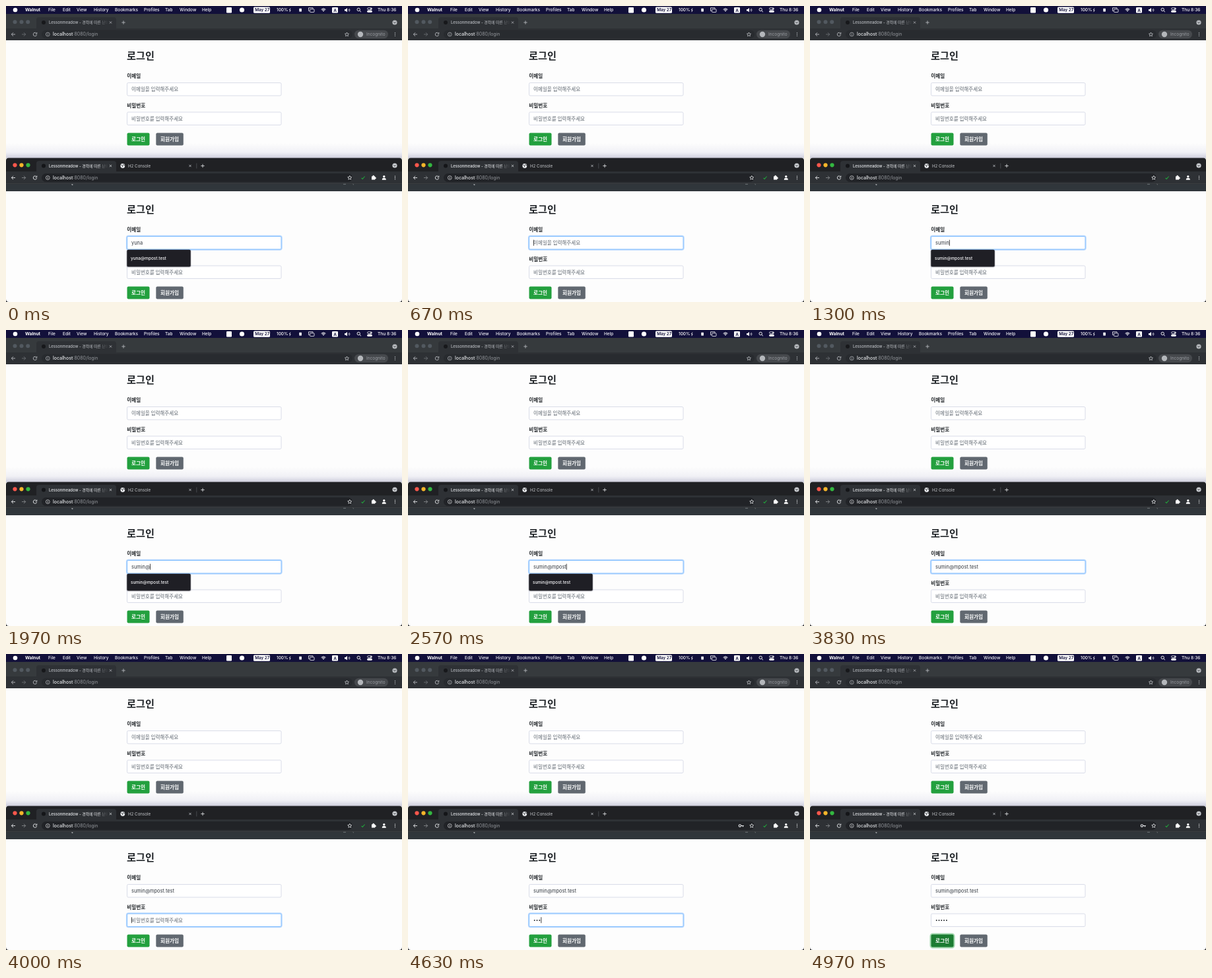
An HTML page with a canvas for the animation above (5.01 s loop, 600 px wide and 449 px high).

```html
<!DOCTYPE html>
<html lang="ko">
<head>
<meta charset="utf-8">
<title>로그인</title>
<style>
html, body { margin: 0; width: 100%; height: 100%; overflow: hidden; background: #000; }
canvas { display: block; width: 600px; height: 449px; }
</style>
</head>
<body>
<canvas id="stage"></canvas>
<script>
const W = 600, H = 449, LOOP = 5010;
const FONT = 'Inter, "Noto Sans CJK KR", "Noto Sans CJK", sans-serif';
const KO = '"Noto Sans CJK KR", "Noto Sans CJK", sans-serif';
const INK = '#212529', PAGE = '#fdfdfd', STRIP = '#202124', BAR = '#2e3135', LIGHT = '#e8eaed';
const OLD_MAIL = 'yuna@mpost.test', NEW_MAIL = 'sumin@mpost.test';

const canvas = document.getElementById('stage');
const ratio = window.devicePixelRatio || 1;
canvas.width = W * ratio;
canvas.height = H * ratio;
const c = canvas.getContext('2d');
c.scale(ratio, ratio);

function text(s, x, y, size, color, weight = 400, family = FONT) {
  c.font = `${weight} ${size}px ${family}`;
  c.fillStyle = color;
  c.textBaseline = 'alphabetic';
  c.fillText(s, x, y);
  return c.measureText(s).width;
}
function box(x, y, w, h, color, r = 0) {
  c.fillStyle = color;
  c.beginPath();
  c.roundRect(x, y, w, h, r);
  c.fill();
}
function frame(x, y, w, h, color, lw, r = 0) {
  c.strokeStyle = color;
  c.lineWidth = lw;
  c.beginPath();
  c.roundRect(x, y, w, h, r);
  c.stroke();
}
function dot(x, y, r, color) {
  c.fillStyle = color;
  c.beginPath();
  c.arc(x, y, r, 0, 7);
  c.fill();
}
function ring(x, y, r, color, lw = 0.8, a = 0, b = Math.PI * 2) {
  c.strokeStyle = color;
  c.lineWidth = lw;
  c.beginPath();
  c.arc(x, y, r, a, b);
  c.stroke();
}
// Each path is a flat list: x0, y0, x1, y1, ...
function line(color, lw, ...paths) {
  c.strokeStyle = color;
  c.lineWidth = lw;
  c.beginPath();
  for (const p of paths)
    for (let i = 0; i < p.length; i += 2) c[i ? 'lineTo' : 'moveTo'](p[i], p[i + 1]);
  c.stroke();
}
const cross = (x, y, color) =>
  line(color, 0.8, [x - 1.6, y - 1.6, x + 1.6, y + 1.6], [x + 1.6, y - 1.6, x - 1.6, y + 1.6]);
const plus = (x, y, color) =>
  line(color, 0.9, [x - 2.7, y, x + 2.7, y], [x, y - 2.7, x, y + 2.7]);

function star(x, y, r, color) {
  const p = [];
  for (let i = 0; i <= 10; i++) {
    const a = i * Math.PI / 5 - Math.PI / 2, q = i % 2 ? r * 0.48 : r;
    p.push(x + q * Math.cos(a), y + q * Math.sin(a));
  }
  line(color, 0.8, p);
}

function menuBar() {
  box(0, 0, W, 12, '#12103a');
  dot(14, 6, 3.3, '#fff');
  text('Walnut', 29, 8.4, 6.7, '#fff', 700);
  const items = [['File', 64], ['Edit', 86], ['View', 107], ['History', 133], ['Bookmarks', 165],
    ['Profiles', 209], ['Tab', 241], ['Window', 263], ['Help', 297]];
  for (const [s, x] of items) text(s, x, 8.4, 6.5, '#f6f6fb', 500);
  box(334, 2, 8, 8.5, '#fff', 1.2);
  dot(357.5, 6, 3.6, '#fff');
  box(375, 1.5, 25, 9.3, '#fff', 1.5);
  text('May 27', 377.2, 8.4, 6.3, '#12103a', 600);
  text('100%', 410, 8.4, 6.4, '#fff', 500);
  line('#fff', 0.8, [431, 3.5, 429.3, 6.2, 431.2, 6.2, 429.7, 9]);
  box(444.3, 3.8, 3.6, 4.6, '#fff', 0.5);
  // screen mirroring
  line('#fff', 0.8, [459.5, 7.6, 458.5, 7.6, 458.5, 2.8, 465, 2.8, 465, 4]);
  frame(460.5, 4.8, 6.5, 4.6, '#fff', 0.8, 0.8);
  for (const r of [1.5, 3.3, 5]) ring(481, 9, r, '#fff', 1, -2.3, -0.84);
  box(494, 2, 9, 8.5, '#fff', 1.2);
  text('A', 496.2, 8.6, 6.5, '#12103a', 600);
  c.fillStyle = '#fff';
  c.beginPath();
  c.moveTo(513, 5); c.lineTo(514.5, 5); c.lineTo(517, 3); c.lineTo(517, 9.3);
  c.lineTo(514.5, 7.4); c.lineTo(513, 7.4);
  c.fill();
  for (const r of [1.7, 3.3]) ring(517.6, 6.2, r, '#fff', 0.7, -0.8, 0.8);
  ring(534.2, 5.4, 2.2, '#fff', 0.9);
  line('#fff', 0.9, [535.9, 7.1, 538, 9.2]);
  frame(547.5, 2.8, 7, 2.7, '#fff', 0.7, 1.35);
  dot(553, 4.2, 1, '#fff');
  box(547.2, 6.6, 7.6, 3.2, '#fff', 1.6);
  text('Thu 8:36', 563, 8.4, 6.6, '#fff', 500);
}

function tabTitle(y, color) {
  const fade = c.createLinearGradient(141, 0, 155, 0);
  fade.addColorStop(0, color);
  fade.addColorStop(1, 'rgba(150,152,156,0)');
  c.save();
  c.beginPath();
  c.rect(65, y - 8, 90, 12);
  c.clip();
  text('Lessonmeadow - 경력에 따른 난이도', 65, y, 5.9, fade, 500);
  c.restore();
}

function toolbar(y, active) {
  const col = active ? LIGHT : '#b9bcc1', dim = active ? '#85888c' : '#6d7075';
  line(col, 0.9, [14, y, 8.4, y], [11, y - 2.7, 8.3, y, 11, y + 2.7]);
  line(dim, 0.9, [24, y, 29.6, y], [27, y - 2.7, 29.7, y, 27, y + 2.7]);
  ring(44, y, 2.7, col, 0.9, 0.2, 5.4);
  line(col, 0.9, [46.8, y - 3, 46.8, y - 0.8, 44.6, y - 0.8]);
  box(54, y - 6.5, 471, 13, active ? '#212327' : '#282b2f', 6.5);
  ring(63.3, y, 2.9, col, 0.7);
  line(col, 0.8, [63.3, y - 0.4, 63.3, y + 1.6], [63.3, y - 1.6, 63.3, y - 0.9]);
  const w = text('localhost', 71, y + 2.4, 7, LIGHT, 500);
  text(':8080/login', 71 + w, y + 2.4, 7, '#94979c');
  for (const d of [-2.3, 0, 2.3]) dot(589.5, y + d, 0.65, col);
}

function roundButton(y, color, mark) {
  dot(589, y, 3.6, color);
  line(mark, 0.8, [587.4, y - 0.6, 589, y + 1, 590.6, y - 0.6]);
}

function topChrome() {
  box(0, 12, W, 22, '#363a3d');
  box(46, 17, 121, 18, BAR, [4, 4, 0, 0]);
  box(0, 34, W, 18, BAR);
  for (const x of [13.5, 23.5, 33.2]) dot(x, 24.2, 3, '#525960');
  dot(57, 25, 3, '#17181b');
  tabTitle(27.2, '#b8bbc0');
  cross(158.5, 25, '#b4b7bb');
  plus(178, 25, '#b4b7bb');
  roundButton(25, '#b4b7bb', BAR);
  toolbar(43, false);
  star(516.5, 43.2, 3.2, '#c4c7cb');
  box(528, 36.8, 51, 12.4, '#46494d', 6.2);
  dot(537, 43, 4.2, '#b4b7bb');
  text('Incognito', 546, 45.3, 6.5, '#9a9da2');
}

function bottomChrome(key) {
  box(0, 230.5, W, 24, STRIP, [4, 4, 0, 0]);
  box(46, 235, 121, 17, BAR, [4, 4, 0, 0]);
  box(0, 251, W, 18.5, BAR);
  box(0, 269.5, W, 11.5, '#30363b');
  line('#202225', 0.7, [0, 269.7, W, 269.7]);
  ['#f8574c', '#f6b52a', '#33b840'].forEach((k, i) => dot(13.5 + i * 10, 241.3, 3.1, k));
  dot(57, 242.5, 3, '#141518');
  tabTitle(244.8, LIGHT);
  cross(158.5, 242.5, '#dfe1e5');
  dot(176.8, 242.5, 3.4, LIGHT);
  line(STRIP, 0.8, [174.5, 241.2, 177, 242, 176.2, 244.4], [178, 239.6, 178.4, 241.4, 180, 242]);
  text('H2 Console', 185, 244.8, 6.2, '#c6c9cd');
  cross(279, 242.5, '#c6c9cd');
  line('#5a5d62', 0.7, [288.8, 238.5, 288.8, 246.5]);
  plus(298, 242.5, '#d5d7da');
  roundButton(242, '#c6c9cd', STRIP);
  toolbar(260.5, true);
  star(520.8, 260.6, 3.2, LIGHT);
  if (key) {
    ring(502.9, 260.5, 1.7, LIGHT, 1.1);
    line(LIGHT, 1.1, [504.6, 260.5, 508.8, 260.5], [507.5, 260.5, 507.5, 262.2]);
  }
  line('#22a63c', 1.1, [538.6, 260.8, 540.2, 262.4, 543.6, 258.5]);
  box(554, 258.3, 5.4, 5.2, '#fff', 0.6);
  dot(556.7, 258, 1.2, '#fff');
  dot(559.6, 260.9, 1.2, '#fff');
  dot(572.8, 258.8, 1.7, '#fff');
  box(569.8, 261, 6, 2.7, '#fff', [2, 2, 0, 0]);
  // sliver of the page header left by scrolling
  line('#e0e2e4', 0.8, [100, 270, 100, 271.4, 101.5, 271]);
  line('#8a8f94', 0.7, [511, 270.3, 515, 270.3], [525.5, 270, 527, 271.2]);
}

function field(y, value, hint, focused, caretOn, secret) {
  if (focused) frame(183.5, y, 233.5, 19.5, 'rgba(110,175,255,.45)', 3.4, 2);
  box(183.5, y, 233.5, 19.5, '#fff', 1.8);
  if (focused) frame(183.5, y, 233.5, 19.5, '#80bdff', 1, 1.8);
  else frame(183.5, y, 233.5, 19.5, '#d0d4e2', 0.8, 1.8);
  const base = y + 12.6;
  let end = 190;
  if (!value) text(hint, 190, base, 7.55, '#5f6770', 400, KO);
  else if (secret) {
    for (let i = 0; i < value.length; i++) dot(191.7 + i * 3.8, y + 10, 0.95, INK);
    end += value.length * 3.8;
  } else end += text(value, 190, base, 7.4, '#343a42');
  if (focused && caretOn) line('#111', 0.8, [end + 0.4, y + 5.2, end + 0.4, y + 14.2]);
}

function form(dy, s) {
  text('로그인', 183, 80.7 + dy, 15.2, INK, 700, KO);
  text('이메일', 183.3, 109.4 + dy, 7.6, INK, 700, KO);
  field(116.5 + dy, s.mail, '이메일을 입력해주세요', s.focus === 'mail', s.caret);
  text('비밀번호', 183.3, 153.9 + dy, 7.6, INK, 700, KO);
  field(161 + dy, s.pass, '비밀번호를 입력해주세요', s.focus === 'pass', s.caret, true);
  const pressed = s.focus === 'button';
  if (pressed) frame(183.5, 192.5 + dy, 34, 19, 'rgba(72,180,97,.5)', 4, 2.5);
  box(183.5, 192.5 + dy, 34, 19, pressed ? '#1c7c32' : '#23a03e', 2);
  text('로그인', 190, 204.8 + dy, 7.6, '#fff', 700, KO);
  box(227.3, 192.5 + dy, 41.5, 19, '#616870', 2);
  text('회원가입', 234, 204.8 + dy, 7.6, '#fff', 700, KO);
}

// Key times in ms; each one erases or adds a character
const ERASE = [140, 220, 300, 380];
const TYPE = [930, 1020, 1110, 1190, 1260, 1740, 2130, 2240, 2340, 2430, 2520,
  2680, 2780, 2870, 2960, 3050];
const PASS = [4370, 4460, 4550, 4640, 4730];
const TO_PASS = 3860, CLICK = 4880;
const count = (list, t) => list.filter(k => k <= t).length;

function stateAt(t) {
  const typed = count(TYPE, t);
  const mail = typed ? NEW_MAIL.slice(0, typed) : OLD_MAIL.slice(0, 4 - count(ERASE, t));
  const focus = t < TO_PASS ? 'mail' : t < CLICK ? 'pass' : 'button';
  const last = Math.max(-600, ...[...ERASE, ...TYPE, TO_PASS, ...PASS].filter(k => k <= t));
  return {
    mail, focus,
    pass: '•'.repeat(count(PASS, t)),
    caret: Math.floor((t - last) / 500) % 2 === 0,
    popup: mail && mail !== NEW_MAIL ? (typed ? NEW_MAIL : OLD_MAIL) : ''
  };
}

function draw(t) {
  const s = stateAt(t);
  box(0, 0, W, H, PAGE);
  menuBar();
  topChrome();
  const shade = c.createLinearGradient(0, 208, 0, 231);
  shade.addColorStop(0, 'rgba(150,150,190,0)');
  shade.addColorStop(0.6, 'rgba(150,150,190,.12)');
  shade.addColorStop(1, 'rgba(130,130,165,.4)');
  box(0, 208, W, 23, shade);
  form(0, { mail: '', pass: '' });

  bottomChrome(s.pass);
  form(233, s);
  if (s.popup) {
    box(182.5, 369.5, 98, 27, 'rgba(40,40,60,.3)', 2.5);
    box(183.3, 369.8, 96.4, 25.7, '#1f1f25', 2);
    text(s.popup, 189, 384.9, 6.4, '#fafafc', 500);
  }
  // rounded lower corners of the window
  c.fillStyle = STRIP;
  c.beginPath();
  for (const x of [0, W]) {
    const k = x ? -1 : 1;
    c.moveTo(x, H);
    c.lineTo(x, H - 4.5);
    c.quadraticCurveTo(x, H, x + 4.5 * k, H);
  }
  c.fill();
}

const start = performance.now();
function tick() {
  draw((performance.now() - start) % LOOP);
  requestAnimationFrame(tick);
}
tick();
</script>
</body>
</html>
```
